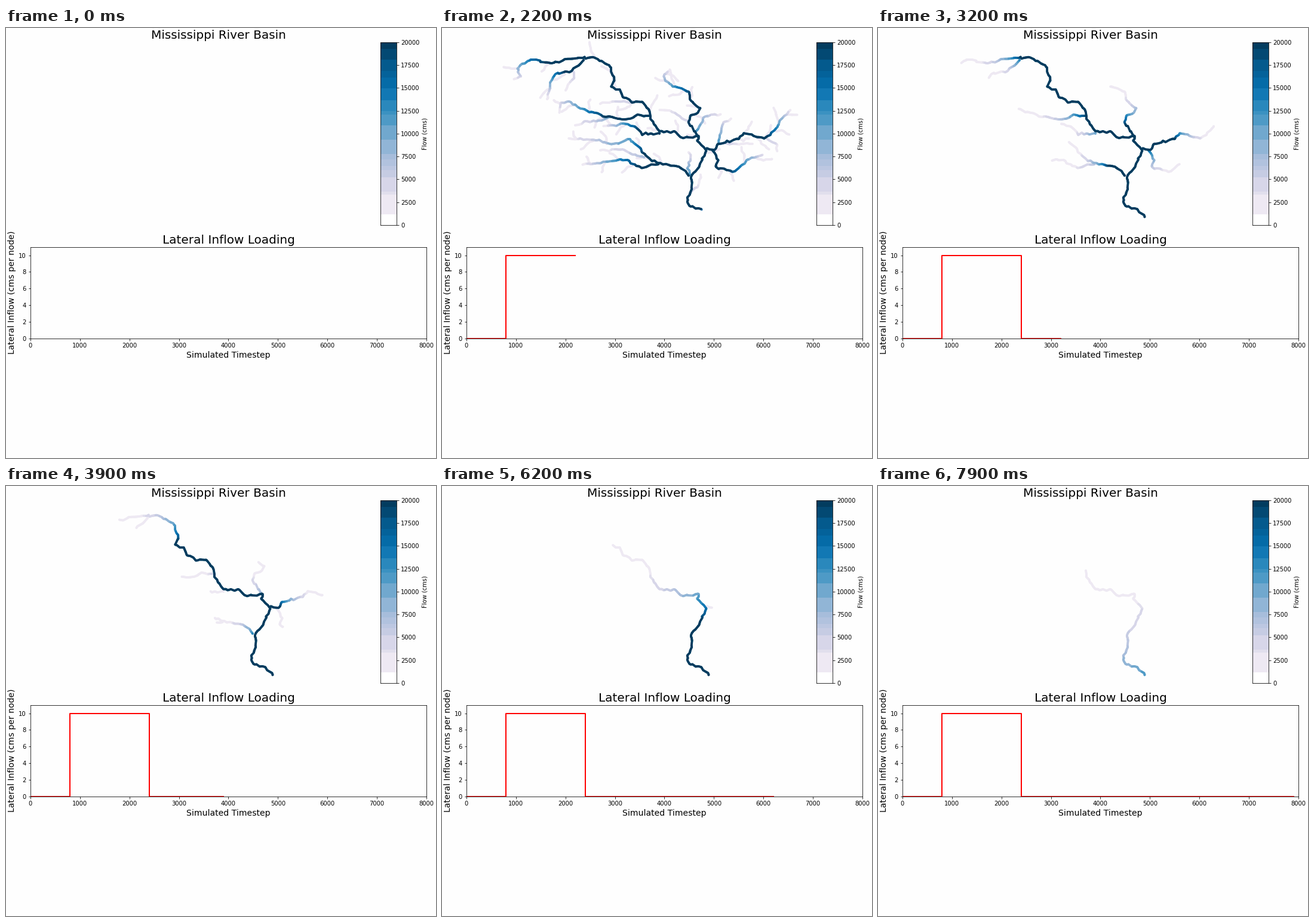
A matplotlib script for the animation above (8 s loop, 720 by 720 pixels).

```python
import numpy as np
import matplotlib.pyplot as plt
from matplotlib.animation import FuncAnimation
from matplotlib.colors import BoundaryNorm, ListedColormap

SIZE, FRAMES, INTERVAL = 720, 80, 100
RAIN_ON, RAIN_OFF, RAIN = 800, 2400, 10
VISIBLE, FULL = 1180, 20000

plt.rcParams["font.family"] = "DejaVu Sans"
rng = np.random.default_rng(7)

# Uneven bands of one blue ramp, white below the visible flow.
edges = np.array([0, 1180, 3333, 3660, 5230, 6010, 6470, 7190, 7780, 9350, 10915,
                  12090, 12480, 13660, 14970, 16145, 16865, 18105, 19280, FULL])
middles = (edges[1:] + edges[:-1]) / 2 / FULL
cmap = ListedColormap(["white", *plt.get_cmap("PuBu")(middles[1:])])
norm = BoundaryNorm(edges, cmap.N, clip=True)

nodes, reaches, clumps = [], [], []


def course(points):
    """Nodes one pixel apart along a meandering line."""
    pts = np.array(points, float)
    arc = np.r_[0, np.cumsum(np.hypot(*np.diff(pts, axis=0).T))]
    s = np.arange(0, arc[-1] + 1)
    bends = np.arange(0, arc[-1] + 5, 5)
    return np.column_stack([
        np.interp(s, arc, p) + np.interp(s, bends, rng.normal(0, 0.9, len(bends)))
        for p in pts.T])


def add_channel(points, head, mouth):
    xy = course(points)
    s = np.arange(len(xy))
    knots = np.arange(0, len(xy) + 25, 25)
    nodes.append(xy)
    reaches.append(np.linspace(head, mouth, len(xy)))
    clumps.append(np.interp(s, knots, rng.uniform(0.8, 1.2, len(knots))))
    return xy


def river(head, mouth, *points, creek_gap=26):
    """Reach grows from head to mouth; creeks join on alternate sides."""
    xy = add_channel(points, head, mouth)
    side = 1
    for i in range(creek_gap // 2, int(len(xy) * 0.75), creek_gap):
        dx, dy = xy[max(i - 8, 0)] - xy[i + 8]
        angle = np.arctan2(dy, dx) + side * rng.uniform(0.5, 1.2)
        length = rng.uniform(14, 30)
        bend = angle + rng.normal(0, 0.4)
        middle = xy[i] + length / 2 * np.array([np.cos(angle), np.sin(angle)])
        source = middle + length / 2 * np.array([np.cos(bend), np.sin(bend)])
        add_channel([source, middle, xy[i]], -42, -38)
        side = -side


def tributary(mouth, *points):
    add_channel(points, -40, mouth)


tributary(-25, (207, 105), (211, 95), (222, 84), (219, 73))
tributary(-22, (265, 126), (292, 123), (320, 124))
tributary(0, (224, 163), (240, 157), (256, 157), (283, 149))
tributary(-12, (265, 205), (302, 203), (320, 212), (340, 217))
tributary(18, (413, 208), (418, 213), (412, 235), (416, 246))
tributary(-25, (434, 246), (428, 265), (414, 278))
tributary(-22, (366, 137), (384, 139), (412, 156))
tributary(18, (466, 146), (450, 145), (440, 150), (424, 174))
tributary(18, (484, 153), (472, 158), (462, 192))
tributary(-22, (563, 206), (562, 196), (543, 184))
tributary(-28, (521, 194), (503, 194), (472, 193))

# Platte, Kansas, Canadian
river(-40, 147, (196, 140), (199, 126), (212, 124), (240, 137), (270, 147),
      (302, 153), (315, 152), (328, 145), (347, 147))
river(-40, 122, (272, 164), (305, 161), (322, 164), (336, 178), (364, 177))
river(-40, 98, (235, 229), (262, 226), (297, 220), (310, 222), (335, 235), (362, 227))
# Arkansas
river(-40, 16, (213, 185), (255, 188), (295, 195), (310, 186), (319, 190))
river(16, 205, (319, 190), (333, 202), (340, 213), (360, 226), (397, 233), (414, 247))
# Yellowstone, Tennessee, Ohio
river(-50, 130, (177, 121), (179, 96), (189, 77), (217, 72), (237, 54), creek_gap=45)
river(-34, 140, (537, 212), (512, 221), (497, 235), (487, 242), (458, 233),
      (461, 222), (453, 203))
river(-40, 250, (584, 138), (565, 155), (562, 166), (540, 186), (507, 176),
      (497, 186), (461, 195), (455, 204), (443, 203), creek_gap=18)
# Upper Mississippi
river(-40, 185, (383, 71), (374, 74), (371, 82), (380, 94), (412, 107), (417, 122),
      (432, 135), (428, 142), (418, 147), (413, 157), (430, 181), creek_gap=18)
# Missouri headwaters, then the main stem down to the sea
river(-40, 150, (121, 85), (132, 83), (125, 67), (148, 52), (183, 59), (215, 51),
      (240, 50), creek_gap=60)
river(150, 594, (240, 50), (252, 49), (280, 62), (289, 88), (284, 98), (300, 107),
      (303, 115), (320, 124), (334, 124), (345, 133), (352, 155), (364, 174),
      (389, 173), (404, 184), (430, 181), (428, 188), (443, 205), (431, 232),
      (417, 250), (419, 270), (410, 291), (417, 300), (433, 304), (446, 316),
      creek_gap=36)

nodes = np.vstack(nodes)
reach = np.hstack(reaches)
clump = np.hstack(clumps)

steady = np.maximum(2000, 9000 + 170 * reach)
swell = (1 + np.cos(2 * np.pi * (reach - 30) / 300)) / 2
early = clump * (2600 + 11000 * swell ** 2)


def flow_at(t):
    """Local filling, a front running to the sea, then a drying tail."""
    elapsed = t - RAIN_ON
    if elapsed <= 0:
        return np.zeros(len(reach))
    x = elapsed / 500
    flow = np.minimum(steady * min(x, 1), early * x * max(x, 1) ** 1.2)
    if t > RAIN_OFF:
        dry = t - RAIN_OFF
        vanishing = 6.5 * np.sqrt(dry) - 166
        brimming = 65 + 0.108 * dry
        level = (reach - vanishing) / (brimming - vanishing)
        flow = np.minimum(steady, VISIBLE * (FULL / VISIBLE) ** level)
    front = 470 + 0.12 * (elapsed - 500)
    return flow * np.clip((front - reach) / 10, 0, 1)


fig = plt.figure(figsize=(10, 10), dpi=72, facecolor="#fefefe")


def pixel_axes(left, top, right, bottom):
    return fig.add_axes([left / SIZE, 1 - bottom / SIZE,
                         (right - left) / SIZE, (bottom - top) / SIZE],
                        facecolor="#fefefe")


basin = pixel_axes(0, 0, SIZE, SIZE)
basin.set(xlim=(0, SIZE), ylim=(SIZE, 0))
basin.axis("off")
basin.text(356, 18, "Mississippi River Basin", size=20, ha="center", va="baseline")
dots = basin.scatter([], [], s=15, linewidths=0)

bar = pixel_axes(627, 23.8, 654, 329.8)
bar.bar(0.5, np.diff(edges), width=1, bottom=edges[:-1], color=cmap.colors,
        antialiased=False)
bar.set(xlim=(0, 1), ylim=(0, FULL), xticks=[], yticks=range(0, FULL + 1, 2500))
bar.yaxis.tick_right()
bar.yaxis.set_label_position("right")
bar.set_ylabel("Flow (cms)")

chart = pixel_axes(41, 366.7, 703.9, 519.7)
chart.set(xlim=(0, 8000), ylim=(0, 11), yticks=range(0, 11, 2))
chart.set_title("Lateral Inflow Loading", size=20)
chart.set_xlabel("Simulated Timestep", size=14)
chart.set_ylabel("Lateral Inflow (cms per node)", size=14)
inflow, = chart.plot([], [], color="red", lw=2)


def loading_until(t):
    corners = [(0, 0), (RAIN_ON, 0), (RAIN_ON, RAIN), (RAIN_OFF, RAIN), (RAIN_OFF, 0)]
    drawn = [c for c in corners if c[0] < t]
    return [*drawn, (t, drawn[-1][1])] if drawn else []


def update(i):
    t = i * INTERVAL
    flow = flow_at(t)
    order = np.argsort(flow)
    order = order[flow[order] >= VISIBLE]
    dots.set_offsets(nodes[order])
    dots.set_facecolors(cmap(norm(flow[order])))
    inflow.set_data(*np.reshape(loading_until(t), (-1, 2)).T)
    return dots, inflow


anim = FuncAnimation(fig, update, frames=FRAMES, interval=INTERVAL,
                     repeat=True, repeat_delay=0)
plt.show()
```
